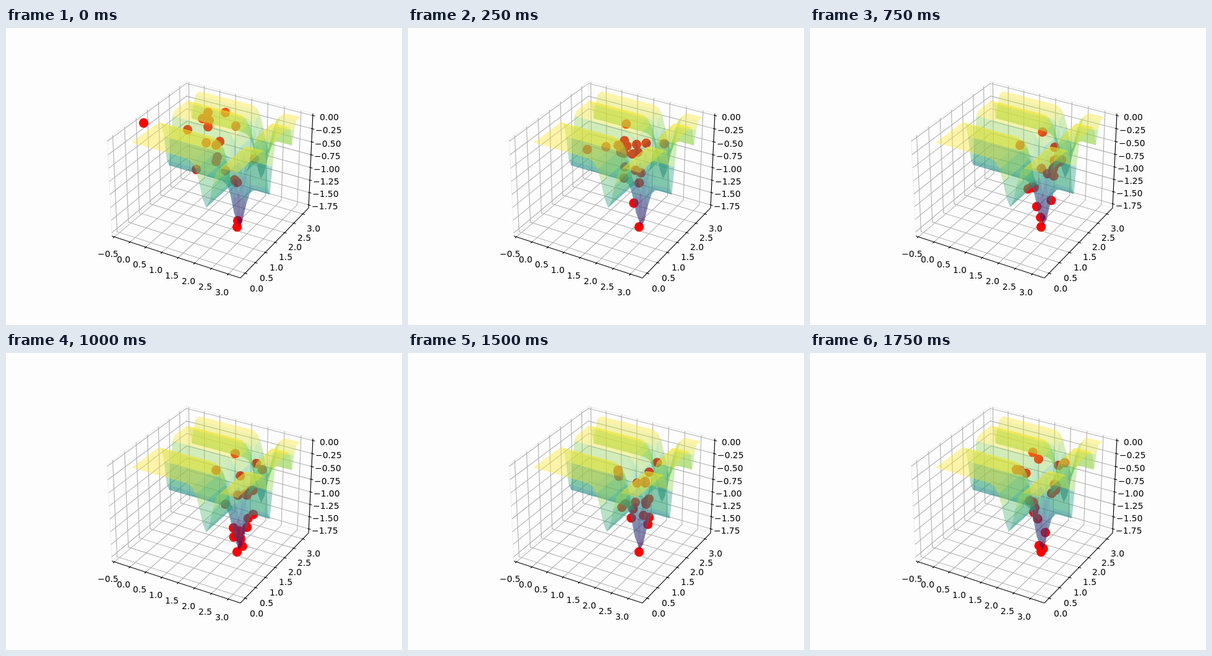
Write an HTML page with a canvas that moves like this. It is 640 by 480 pixels and loops after 2 s.

```html
<!DOCTYPE html>
<html lang="en">
<head>
<meta charset="utf-8">
<title>Swarm on a valley surface</title>
<style>
  html, body { margin: 0; width: 100%; height: 100%; overflow: hidden; background: #fdfdfd; }
  canvas { display: block; width: 640px; height: 480px; }
</style>
</head>
<body>
<canvas id="stage" width="640" height="480"></canvas>
<script>
const ctx = document.getElementById('stage').getContext('2d');
const STEP_MS = 250;
const STEPS = 8;

// Camera: elevation 30, azimuth -60, distance 10.
const SIZE = [8 / 7, 8 / 7, 6 / 7];
const S3 = Math.sqrt(3) / 2;
const SCALE = 1997.8;

// Takes unit coordinates inside the axis limits.
function project(unit) {
  const [x, y, z] = unit.map((u, i) => (u - 0.5) * SIZE[i]);
  const depth = S3 * 0.5 * x - 0.75 * y + 0.5 * z;
  const k = SCALE / (10 - depth);
  return {
    x: 333 + k * (S3 * x + 0.5 * y),
    y: 237.6 - k * (-0.25 * x + S3 * 0.5 * y + S3 * z),
    depth
  };
}

// Surface with two crossing families of valleys.
const height = (x, y) =>
  -Math.sin(x) * Math.sin(x * x / Math.PI) ** 20
  - Math.sin(y) * Math.sin(2 * y * y / Math.PI) ** 20;

const CELLS = 31;
const quads = [];
for (let i = 0; i < CELLS; i++) {
  for (let j = 0; j < CELLS; j++) {
    const pts = [[i, j], [i + 1, j], [i + 1, j + 1], [i, j + 1]]
      .map(([a, b]) => [a / 10, b / 10, height(a / 10, b / 10)]);
    quads.push({ pts, mean: pts.reduce((s, p) => s + p[2], 0) / 4 });
  }
}
const means = quads.map(q => q.mean);
const low = Math.min(...means), high = Math.max(...means);

const ramp = [[68, 1, 84], [59, 81, 139], [33, 144, 141], [92, 200, 99], [253, 231, 37]];
function shade(t) {
  const p = t * (ramp.length - 1);
  const i = Math.min(Math.floor(p), ramp.length - 2);
  const rgb = ramp[i].map((c, n) => Math.round(c + (ramp[i + 1][n] - c) * (p - i)));
  return `rgba(${rgb}, 0.4)`;
}
quads.forEach(q => { q.color = shade((q.mean - low) / (high - low)); });

function trace(points) {
  ctx.beginPath();
  points.forEach(p => ctx.lineTo(p.x, p.y));
}
function line(units, color) {
  trace(units.map(project));
  ctx.strokeStyle = color;
  ctx.lineWidth = 1.11;
  ctx.stroke();
}

const A = -1 / 48, B = 49 / 48;
const LABEL = 0.0864, OUT = 0.2 / 12, IN = 0.1 / 12;
const ticks = (from, to, by) =>
  Array.from({ length: Math.round((to - from) / by) + 1 }, (_, i) => from + i * by);

// Per axis: tick values, decimals, and unit-space paths for value u.
const axes = [
  { values: ticks(-0.5, 3, 0.5), digits: 1,
    grid: u => [[u, A, A], [u, B, A], [u, B, B]],
    tick: u => [[u, A - OUT, A], [u, A + IN, A]],
    label: u => [u, A - LABEL, A - LABEL] },
  { values: ticks(0, 3, 0.5), digits: 1,
    grid: u => [[B, u, A], [A, u, A], [A, u, B]],
    tick: u => [[B + OUT, u, A], [B - IN, u, A]],
    label: u => [B + LABEL, u, A - LABEL] },
  { values: ticks(-1.75, 0, 0.25), digits: 2,
    grid: u => [[A, A, u], [A, B, u], [B, B, u]],
    tick: u => [[B + OUT, B, u], [B - IN, B, u]],
    label: u => [B + LABEL, B + LABEL, u] },
];

function drawLabel(text, at) {
  const left = at.x - ctx.measureText(text).width / 2;
  ctx.fillText(text, Math.round(left + 0.3), Math.round(at.y + 11));
}

function drawAxes(toUnit) {
  const pane = 'rgba(0, 0, 0, 0.06)';
  line([[A, A, A], [A, B, A], [A, B, B], [A, A, B], [A, A, A]], pane);
  line([[A, B, A], [B, B, A], [B, B, B], [A, B, B]], pane);

  axes.forEach((axis, n) => axis.values.forEach(v =>
    line(axis.grid(toUnit(v, n)), '#b0b0b0')));
  line([[A, A, A], [B, A, A]], '#000');
  line([[B, A, A], [B, B, A]], '#000');
  line([[B, B, A], [B, B, B]], '#000');

  ctx.font = '13.89px "DejaVu Sans", sans-serif';
  ctx.fillStyle = '#000';
  axes.forEach((axis, n) => axis.values.forEach(v => {
    const u = toUnit(v, n);
    line(axis.tick(u), '#000');
    drawLabel(v.toFixed(axis.digits).replace('-', '\u2212'), project(axis.label(u)));
  }));
}

// Where the swarm starts on screen; the first few dots never leave.
const HOLD = 2;
const starts = [
  [373, 321], [339, 189], [374, 311], [222, 153], [293, 164], [307, 228], [326, 136],
  [354, 136], [317, 146], [328, 149], [326, 159], [371, 158], [323, 185], [345, 183],
  [341, 208], [339, 215], [354, 230], [369, 245], [373, 249], [401, 211]];

function random(seed) {
  const v = Math.sin(seed * 12.9898) * 43758.5453;
  return v - Math.floor(v);
}

// Sum of two draws: values bunch around the middle.
const around = (middle, reach, seed) =>
  middle + reach * (random(seed) + random(seed + 0.5) - 1);

// A fresh landing place on the surface, close to the deepest pit.
function landing(i, step, toUnit) {
  const seed = 1 + i * 4 + step * 101;
  const x = around(2.2, 0.6, seed), y = around(1.6, 0.9, seed + 2);
  return project([x, y, height(x, y)].map(toUnit));
}

function drawDots(step, toUnit) {
  ctx.fillStyle = '#f00';
  starts.forEach(([sx, sy], i) => {
    const goal = landing(i, step, toUnit);
    const pull = i < HOLD ? 0 : Math.min(step / 2, 1);
    ctx.beginPath();
    ctx.arc(sx + 0.5 + (goal.x - sx) * pull, sy + 0.5 + (goal.y - sy) * pull,
      7.64, 0, 2 * Math.PI);
    ctx.fill();
  });
}

function drawSurface(toUnit) {
  quads.map(q => {
    const pts = q.pts.map(p => project(p.map(toUnit)));
    return { pts, color: q.color, depth: pts.reduce((s, p) => s + p.depth, 0) };
  }).sort((a, b) => a.depth - b.depth).forEach(q => {
    trace(q.pts);
    ctx.fillStyle = q.color;
    ctx.fill();
  });
}

function padded(min, max) {
  const pad = (max - min) * 0.05;
  return [min - pad, max + pad];
}

// The axes widen as the swarm finds new extremes.
function draw(step) {
  const xMax = step < 6 ? 3.1 : 3.156;
  const zMin = step < 3 ? -1.775 : -1.797;
  const limits = [padded(-0.33, xMax), padded(0, 3.1), [zMin, 0]];
  const toUnit = (v, n) => (v - limits[n][0]) / (limits[n][1] - limits[n][0]);
  ctx.fillStyle = '#fdfdfd';
  ctx.fillRect(0, 0, 640, 480);
  drawAxes(toUnit);
  drawDots(step, toUnit);
  drawSurface(toUnit);
}

const start = performance.now();
let shown = -1;
function tick() {
  const step = Math.floor((performance.now() - start) / STEP_MS) % STEPS;
  if (step !== shown) draw(shown = step);
  requestAnimationFrame(tick);
}
tick();
</script>
</body>
</html>
```
